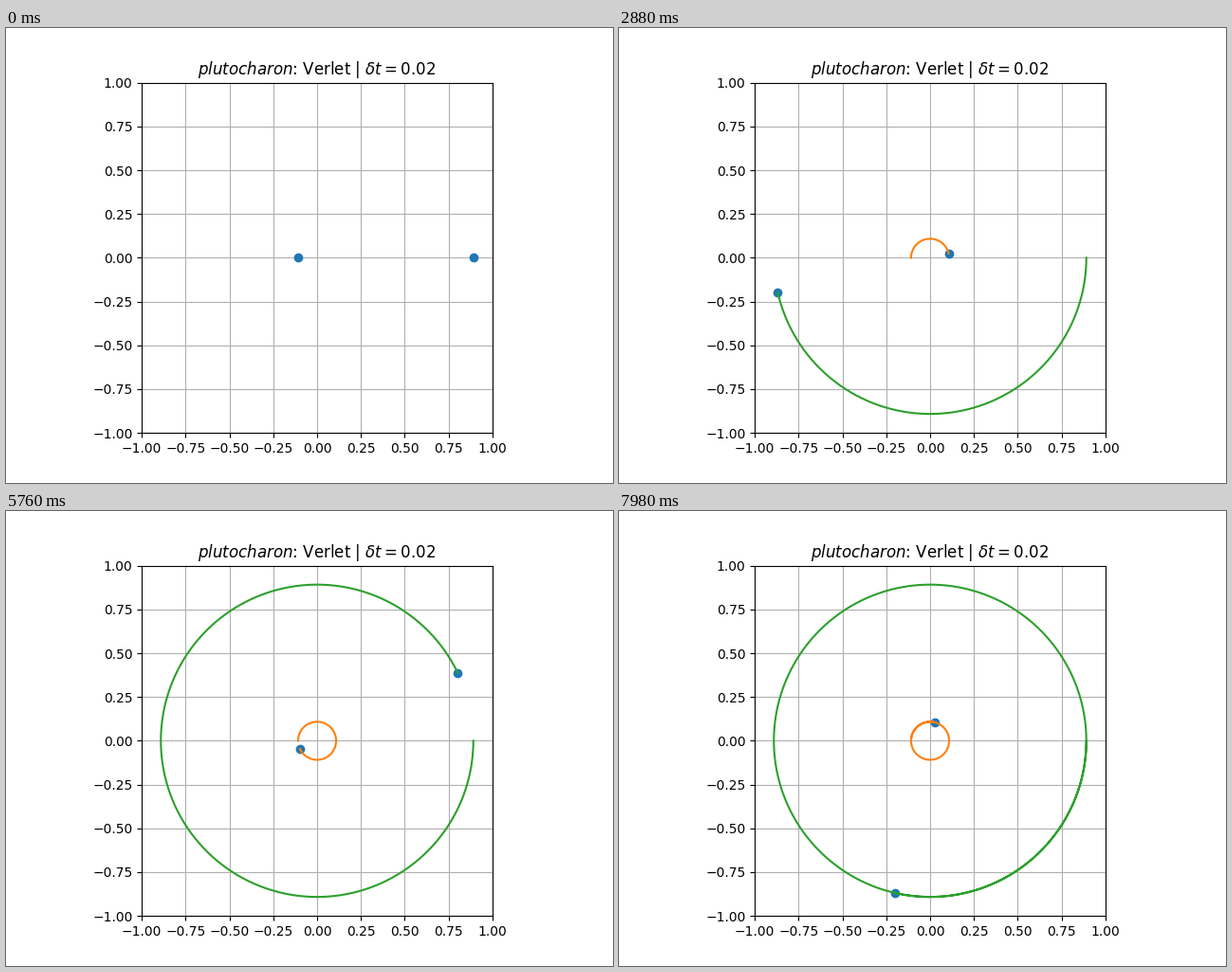
Recreate the animation shown at these times as a matplotlib script. Size 640 by 480 pixels, loop 8 s.

```python
import numpy as np
import matplotlib.pyplot as plt
from matplotlib.animation import FuncAnimation

plt.rcParams["font.family"] = "DejaVu Sans"

LOOP_MS, TICK_MS, POSE_MS = 8000, 20, 60
SUBSTEPS = 3                                # integration steps per pose
STEP = np.radians(3.4821) / SUBSTEPS        # angle swept per step
MASS_RATIO = 0.1218
R_OUTER = 1 / (1 + MASS_RATIO)
R_INNER = 1 - R_OUTER

fig, ax = plt.subplots(figsize=(6.4, 4.8), dpi=100)
ax.set(xlim=(-1, 1), ylim=(-1, 1), aspect="equal")
ax.set_title(r"$plutocharon$: Verlet | $\delta t = 0.02$")
ax.grid(True)

# Render the fixed axes once and reuse them as a backdrop.
fig.canvas.draw()
backdrop = np.asarray(fig.canvas.buffer_rgba()).copy()
ax.set_axis_off()
ax.set_title("")
fig.figimage(backdrop, zorder=-1, origin="upper")

bodies, = ax.plot([], [], "o", color="C0")
inner_trail, = ax.plot([], [], color="C1")
outer_trail, = ax.plot([], [], color="C2")


def orbit(radius, angle):
    """Clockwise circular path."""
    return radius * np.cos(angle), -radius * np.sin(angle)


def update(i):
    pose = i * TICK_MS // POSE_MS
    angle = STEP * np.arange(pose * SUBSTEPS + 1)
    inner = orbit(-R_INNER, angle)
    outer = orbit(R_OUTER, angle)
    inner_trail.set_data(*inner)
    outer_trail.set_data(*outer)
    bodies.set_data([inner[0][-1], outer[0][-1]],
                    [inner[1][-1], outer[1][-1]])
    return bodies, inner_trail, outer_trail


anim = FuncAnimation(fig, update, frames=LOOP_MS // TICK_MS,
                     interval=TICK_MS, repeat=True, repeat_delay=0)
plt.show()
```
